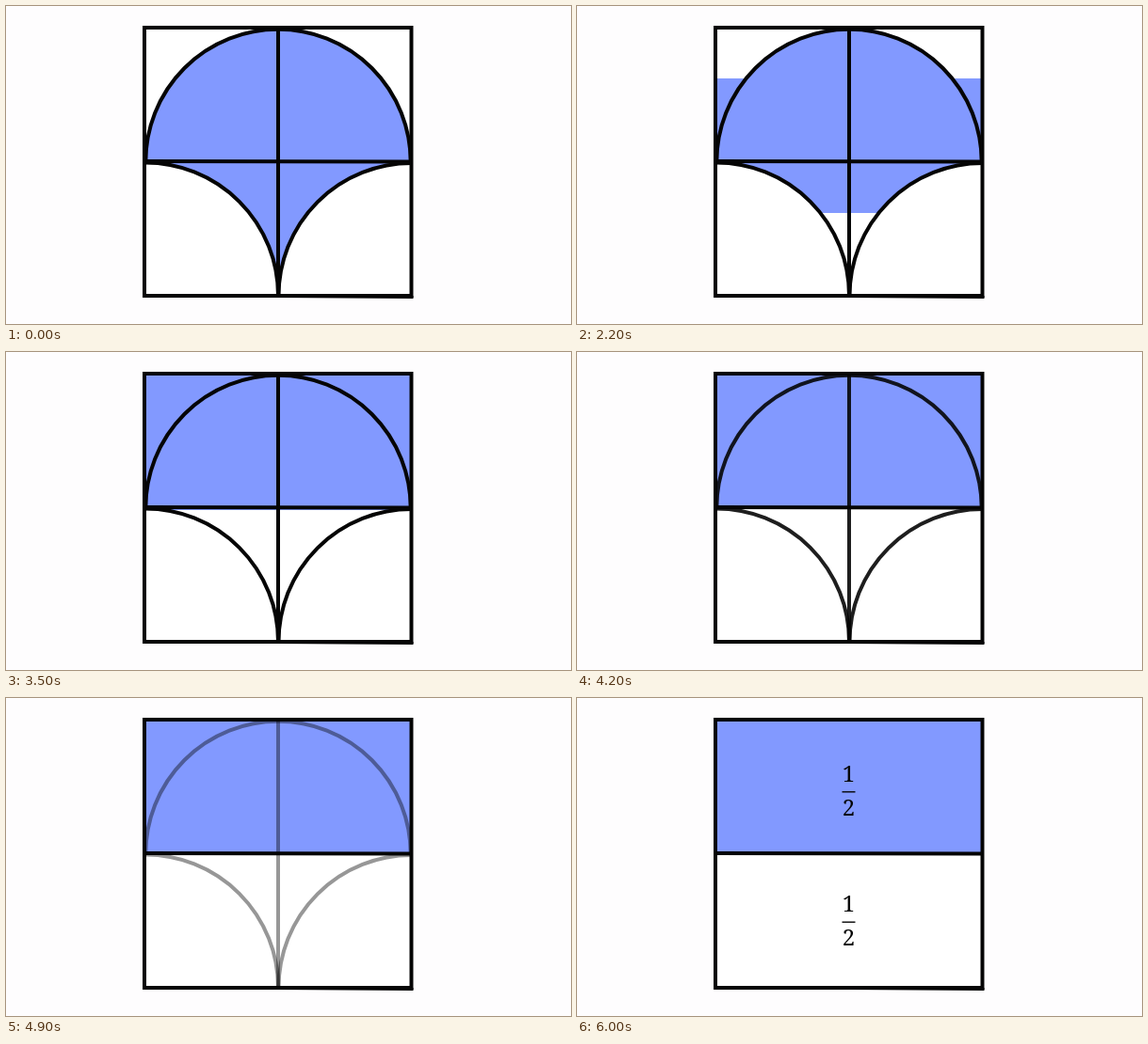
Animation of 600x338 px, one loop 6100 ms. Source, as an HTML page with a canvas:

```html
<!DOCTYPE html>
<html lang="en">
<head>
<meta charset="utf-8">
<title>Half of a square</title>
<style>
html, body { margin: 0; width: 100%; height: 100%; overflow: hidden; background: #fefdfe; }
canvas { display: block; width: 600px; height: 338px; }
</style>
</head>
<body>
<canvas id="stage" width="600" height="338"></canvas>
<script>
const ctx = document.getElementById('stage').getContext('2d');
const LOOP = 6100, STEP = 100;
const BLUE = '#8299ff', BLACK = '#050505';
const left = 147, right = 430.5, top_ = 23, middle = 165.3, bottom = 308, center = 289;
const clamp = v => Math.min(1, Math.max(0, v));

function path(build) {
  ctx.beginPath();
  build();
}

function stroke(build) {
  path(build);
  ctx.stroke();
}

function line(x1, y1, x2, y2) {
  stroke(() => { ctx.moveTo(x1, y1); ctx.lineTo(x2, y2); });
}

const dome = () => ctx.arc(center, 165.5, 140.7, Math.PI, 0);
const leftArc = () => ctx.arc(148, 307.5, 141, -Math.PI / 2, 0);
const rightArc = () => ctx.arc(430.5, 308, 141, Math.PI, Math.PI * 1.5);

// Distance the sliding blue band still has to travel.
function remaining(t) {
  if (t < 1500) return 142;
  return 142 * clamp((3801 - t) * 0.000385) ** 2;
}

function drawFill(rest) {
  ctx.fillStyle = BLUE;
  path(dome);
  ctx.fill();
  ctx.fillRect(left, top_ + rest, right - left, middle - top_ - rest);

  ctx.save();
  path(() => ctx.rect(left, middle, right - left, rest + 0.7));
  ctx.clip();
  path(() => { leftArc(); rightArc(); ctx.closePath(); });
  ctx.fill();
  ctx.restore();
}

function drawGuides(alpha) {
  ctx.globalAlpha = alpha;
  stroke(dome);
  stroke(leftArc);
  stroke(rightArc);
  line(center, top_ + 1, center, bottom - 1);
  ctx.globalAlpha = 1;
}

function drawFrame() {
  ctx.lineJoin = 'miter';
  ctx.strokeRect(left, top_, right - left, bottom - top_);
  ctx.fillStyle = BLACK;
  path(() => {
    ctx.moveTo(center, bottom);
    ctx.lineTo(432.5, bottom);
    ctx.lineTo(432.5, 311);
    ctx.lineTo(center, 310);
  });
  ctx.fill();
}

function drawHalf(y, alpha) {
  ctx.globalAlpha = alpha;
  ctx.fillStyle = BLACK;
  ctx.fillText('1', 288.5, y - 11);
  ctx.fillRect(281.5, y - 0.7, 14, 1.4);
  ctx.fillText('2', 288.5, y + 25);
  ctx.globalAlpha = 1;
}

function draw(t) {
  ctx.fillStyle = '#fefdfe';
  ctx.fillRect(0, 0, 600, 338);
  ctx.fillStyle = '#fff';
  ctx.fillRect(left, top_, right - left, bottom - top_);
  drawFill(remaining(t));

  ctx.strokeStyle = BLACK;
  ctx.lineWidth = 4;
  const guides = t < 4000 ? 1 : clamp(Math.min(0.98, (5500 - t) / 1450));
  drawGuides(guides);
  line(left, 165, right, 165.6);
  drawFrame();

  ctx.font = '24px "Noto Serif", serif';
  ctx.textAlign = 'center';
  const label = clamp((t - 5500) / 500);
  drawHalf(99.8, label);
  drawHalf(238.2, label);
}

function tick() {
  const t = performance.now() % LOOP;
  draw(Math.floor(t / STEP) * STEP);
  requestAnimationFrame(tick);
}
tick();
</script>
</body>
</html>
```
